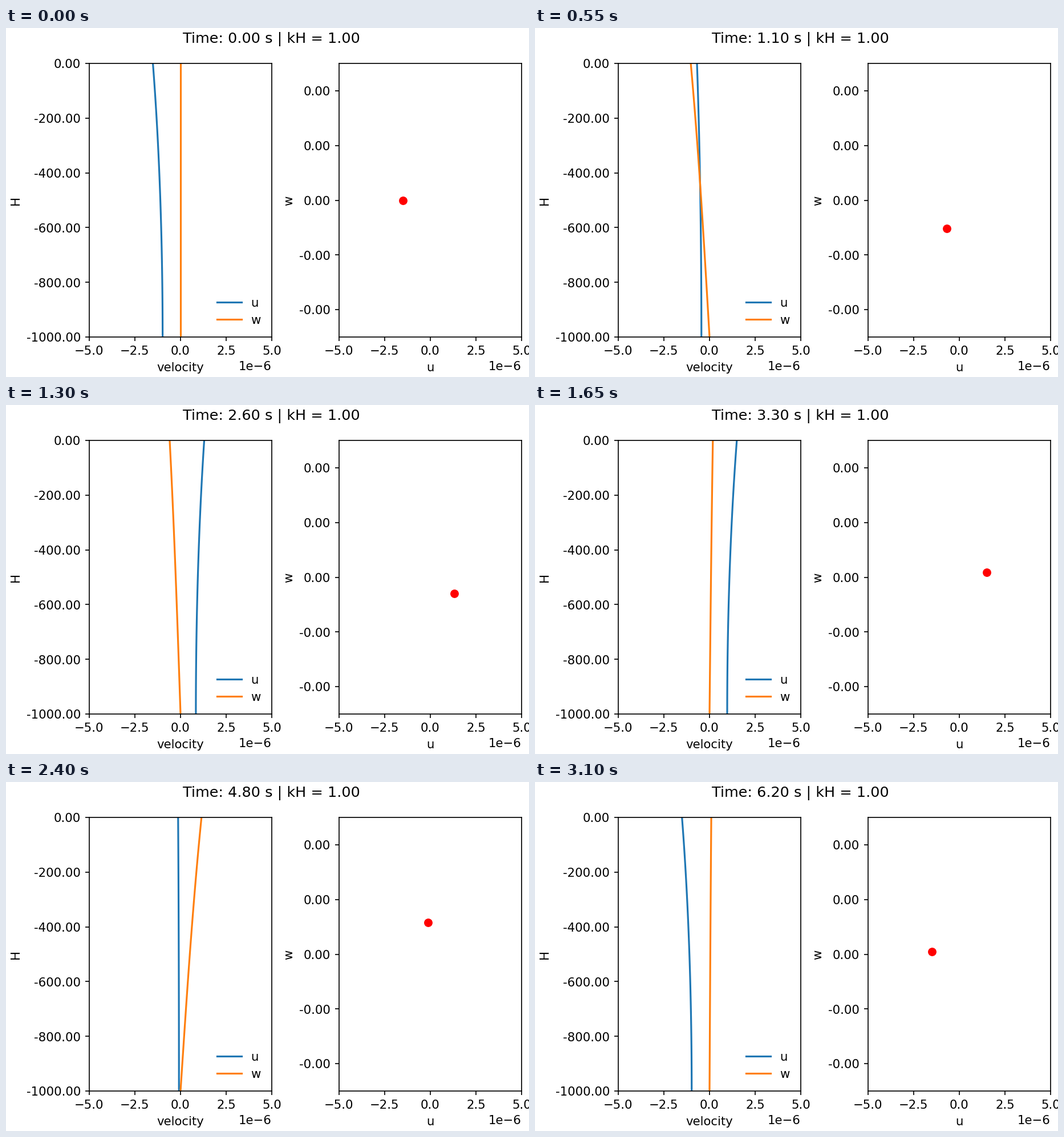
A matplotlib script that plays this animation: 917x611 px, repeating every 3150 ms.

```python
import numpy as np
import matplotlib.pyplot as plt
from matplotlib.animation import FuncAnimation
from matplotlib.ticker import FormatStrFormatter

W, H = 917, 611
DPI = W / 6
FRAMES, INTERVAL = 63, 50
DT = 0.1                # simulated seconds per frame
DEPTH, KH = 1000.0, 1.0
AMP = 0.981e-6          # velocity scale at the bed
LIM = 5e-6

plt.rcParams["font.family"] = "DejaVu Sans"

fig = plt.figure(figsize=(6, 4), dpi=DPI, facecolor="white")
fig_w, fig_h = fig.bbox.width, fig.bbox.height


def add_panel(left, right, xlabel, ylabel, ylim, yticks, top=62, bottom=541):
    """Axes placed by pixel edges, measured from the top left."""
    ax = fig.add_axes([left / fig_w, (H - bottom) / fig_h,
                       (right - left) / fig_w, (bottom - top) / fig_h])
    ax.set_xlim(-LIM, LIM)
    ax.set_xticks(np.linspace(-LIM, LIM, 5))
    ax.set_ylim(*ylim)
    ax.set_yticks(yticks)
    ax.yaxis.set_major_formatter(FormatStrFormatter("%.2f"))
    ax.set_xlabel(xlabel)
    ax.set_ylabel(ylabel)
    return ax


profile = add_panel(146, 466, "velocity", "H", (-DEPTH, 0),
                    np.arange(-1000, 1, 200))
orbit = add_panel(584, 904, "u", "w", (-LIM, LIM),
                  np.arange(-4, 5, 2) * 1e-6)

z = np.linspace(-DEPTH, 0, 100)
phase = KH * (1 + z / DEPTH)
u_shape = -AMP * np.cosh(phase)
w_shape = -AMP * np.sinh(phase)

u_line, = profile.plot(u_shape, z, color="tab:blue", label="u")
w_line, = profile.plot(0 * z, z, color="tab:orange", label="w")
profile.legend(loc="lower right", frameon=False)
dot, = orbit.plot([], [], "ro")
title = fig.text(465.8 / fig_w, (H - 26) / fig_h, "", fontsize=12,
                 ha="center", va="baseline")


def update(i):
    t = i * DT
    u = u_shape * np.cos(t)
    w = w_shape * np.sin(t)
    u_line.set_xdata(u)
    w_line.set_xdata(w)
    dot.set_data([u[-1]], [w[-1]])
    title.set_text(f"Time: {t:.2f} s | kH = {KH:.2f}")
    return u_line, w_line, dot, title


anim = FuncAnimation(fig, update, frames=FRAMES, interval=INTERVAL,
                     repeat=True, repeat_delay=0, blit=False)
plt.show()
```
